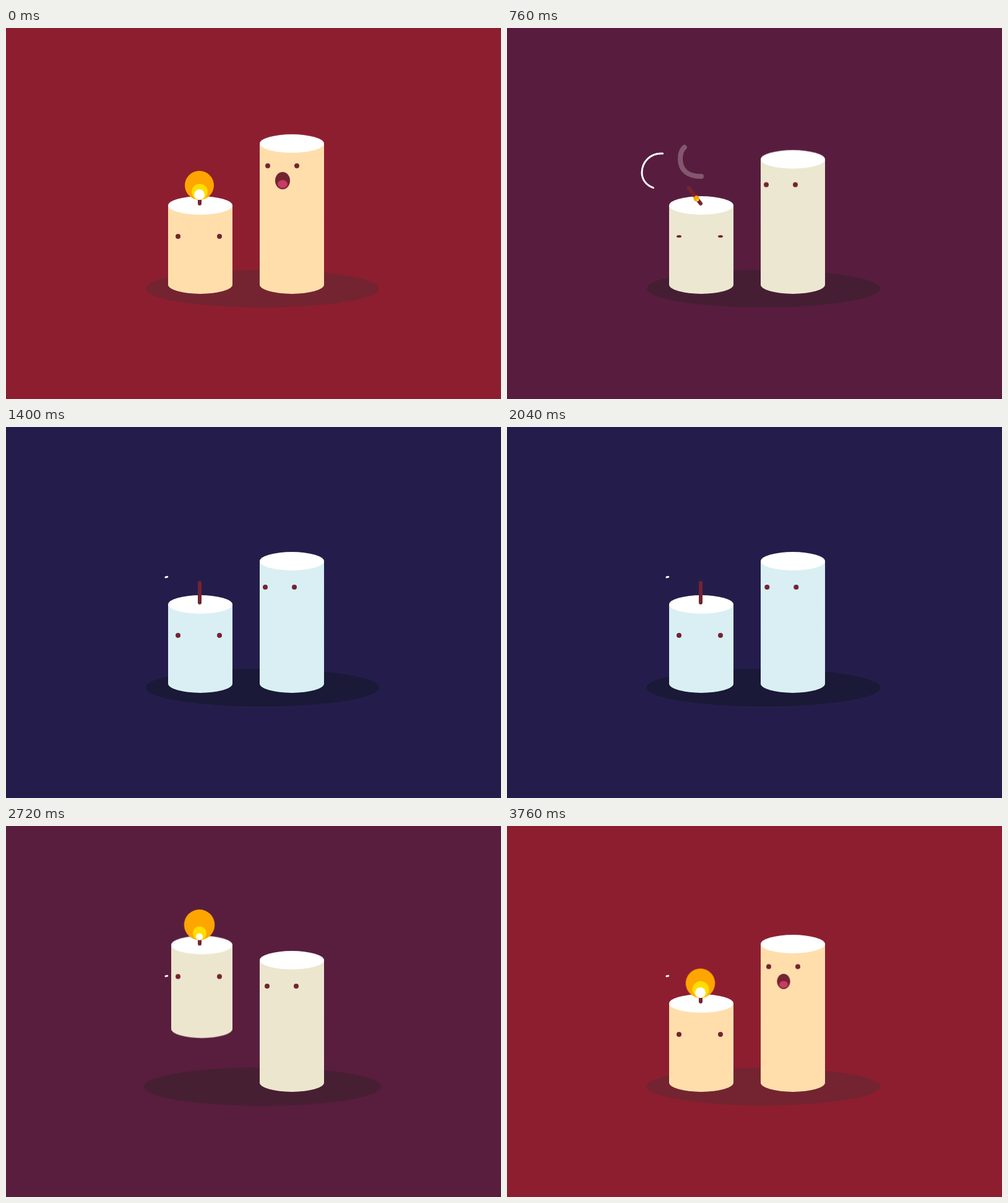
Recreate the animation shown at these times as an HTML page without scripts. Size 800 by 600 pixels, loop 3800 ms.

```html
<!DOCTYPE html>
<html lang="en">
<head>
<meta charset="utf-8">
<title>Two candles</title>
<style>
html, body { margin: 0; width: 100%; height: 100%; overflow: hidden; }
svg { display: block; width: 800px; height: 600px; }
svg * { animation: 3.8s linear infinite; }

/* Colours that change with the light */
.room { --warm: #8d1e30; --cool: #241d4c; animation-name: tint; }
.wax { --warm: #ffdeac; --cool: #d9eff3; animation-name: tint; }
.shadow { --warm: #742430; --cool: #1a1937; animation-name: tint, ground; transform-origin: 414.5px 421.5px; }
.dark { fill: #742331; }
@keyframes tint {
  0%, 18.2%, 73.2%, 100% { fill: var(--warm); }
  21.8%, 70% { fill: var(--cool); }
}
@keyframes ground {
  0%, 62%, 91%, 100% { transform: scale(1); }
  68.4% { transform: scale(.96); }
  71.6% { transform: scale(1.013); }
  75.5% { transform: scale(1.1); }
  80% { transform: scale(.963); }
  85% { transform: scale(1.008); }
}

/* Short candle */
.hop { animation-name: hop; }
@keyframes hop {
  0%, 55%, 88%, 100% { transform: none; }
  59.5%, 60.5% { transform: translateY(8px); }
  62.1% { transform: translateY(0); animation-timing-function: cubic-bezier(.33, .67, .67, 1); }
  68.4% { transform: translateY(-126px); animation-timing-function: cubic-bezier(.33, 0, .67, .33); }
  74.7% { transform: translateY(0); }
  76.3% { transform: translateY(8px); }
  80% { transform: translateY(4px); }
}
.short { animation-name: tint, squash; }
@keyframes squash {
  0%, 55%, 88%, 100% { d: path("M262 287V415A52 15 0 0 0 366 415V287Z"); }
  59.5%, 60.5% { d: path("M255 291V407A59 15 0 0 0 373 407V291Z"); }
  62.1% { d: path("M266 283V415A49 15 0 0 0 364 415V283Z"); }
  68.4% { d: path("M264 287V417A51 15 0 0 0 366 417V287Z"); }
  71.6% { d: path("M267 286V421.5A49.5 15 0 0 0 366 421.5V286Z"); }
  74.7% { d: path("M267 286V415A49.5 15 0 0 0 366 415V286Z"); }
  76.3% { d: path("M256 291V407A59.5 15 0 0 0 375 407V291Z"); }
  80% { d: path("M259.5 289V411A55.75 15 0 0 0 371 411V289Z"); }
}
.rim { animation-name: rim; }
@keyframes rim {
  0%, 55%, 88%, 100% { cx: 314px; cy: 287px; rx: 52px; }
  59.5%, 60.5% { cx: 314px; cy: 291px; rx: 59px; }
  62.1% { cx: 315px; cy: 283px; rx: 49px; }
  68.4% { cx: 315px; cy: 287px; rx: 51px; }
  71.6%, 74.7% { cx: 316.5px; cy: 286px; rx: 49.5px; }
  76.3% { cx: 315.5px; cy: 291px; rx: 59.5px; }
  80% { cx: 315.25px; cy: 289px; rx: 55.75px; }
}
.blink { animation-name: blink; transform-origin: 312px 337px; }
@keyframes blink {
  0%, 13%, 21%, 100% { transform: scaleY(1); }
  14.5%, 19% { transform: scaleY(0); }
}
.wick { animation-name: bend; transform-origin: 313px 284px; }
@keyframes bend {
  0%, 15.5%, 35%, 100% { transform: rotate(0); }
  17.9% { transform: rotate(-13.8deg); }
  22.1%, 24% { transform: rotate(-60deg); animation-timing-function: ease-in-out; }
}
.flame { animation-name: flame; transform-origin: 312.5px 278px; }
@keyframes flame {
  0%, 100% { transform: scale(1); }
  17.9% { transform: scale(var(--blown)); }
  20.5%, 69% { transform: scale(0); }
  71.6% { transform: scale(var(--lit)); }
  80% { transform: scale(var(--low)); }
  98.95% { transform: scale(var(--calm)); }
}

/* Tall candle */
.lift { animation-name: lift; }
@keyframes lift {
  0%, 100% { transform: translateY(-30px); animation-timing-function: ease-out; }
  5% { transform: translateY(-45px); }
  9.5% { transform: translateY(-44px); animation-timing-function: ease-in-out; }
  15.5% { transform: translateY(4px); }
  17.9% { transform: translateY(2px); }
  22.1% { transform: translateY(-11px); animation-timing-function: ease-out; }
  24% { transform: translateY(-12px); animation-timing-function: ease-in-out; }
  36%, 90.5% { transform: translateY(0); animation-timing-function: cubic-bezier(.4, 0, .8, .8); }
  98.95% { transform: translateY(-26px); }
}
.puff { animation-name: tint, puff; transform-origin: 462px 296px; }
@keyframes puff {
  0%, 2%, 15%, 100% { transform: scaleX(.8); }
  7.5%, 10% { transform: scaleX(1); }
}
.face { animation-name: face; }
@keyframes face {
  0%, 5%, 100% { transform: translate(0, -6px); }
  11%, 17.9% { transform: translate(-4px, -2px); }
  22.1%, 40% { transform: translate(-4px, 0); }
  53.7% { transform: translate(-2.7px, 0); }
  71.6% { transform: translate(-1px, 0); }
  80% { transform: translate(-.5px, 0); }
  90.5% { transform: none; }
  98.95% { transform: translate(0, -5.5px); }
}
.mouth { animation-name: gasp; transform-origin: 447px 283px; }
@keyframes gasp {
  0%, 100% { transform: scale(1); }
  3% { transform: scale(1.1); }
  8%, 91% { transform: scale(0); }
  98.95% { transform: scale(.88); }
}

/* Breath and smoke */
.air { fill: none; stroke: #fff; stroke-linecap: round; }
.breath { stroke-width: 3; stroke-dasharray: 84 400; animation-name: breath; }
@keyframes breath {
  0%, 10.07% { stroke-dashoffset: 90; }
  25.6%, 100% { stroke-dashoffset: -306; }
}
.smoke { stroke-width: 8; stroke-dasharray: 89 400; opacity: .26; animation-name: smoke; }
@keyframes smoke {
  0%, 16.4% { stroke-dashoffset: 95; }
  17.9% { stroke-dashoffset: 63; }
  22.1% { stroke-dashoffset: -26; }
  35.5%, 100% { stroke-dashoffset: -310; }
}
</style>
</head>
<body>
<svg viewBox="0 0 800 600">
  <clipPath id="base"><path d="M380 0H540V415H514A52 15 0 0 1 410 415H380Z"/></clipPath>
  <rect class="room" width="800" height="600"/>
  <ellipse class="shadow" cx="414.5" cy="421.5" rx="189" ry="30.5"/>

  <g class="hop">
    <path class="wax short" d="M262 287V415A52 15 0 0 0 366 415V287Z"/>
    <ellipse class="rim" cx="314" cy="287" rx="52" ry="15" fill="#fff"/>
    <g class="dark blink">
      <circle cx="278" cy="337" r="4"/>
      <circle cx="345" cy="337" r="4"/>
    </g>
    <g class="wick">
      <path d="M313 252V284" stroke="#742331" stroke-width="6" stroke-linecap="round"/>
      <circle class="flame" style="--blown:1.085;--lit:1.053;--low:.84;--calm:1.01" cx="312.5" cy="254.5" r="23.5" fill="#ffa500"/>
      <circle class="flame" style="--blown:.73;--lit:.85;--low:1.08;--calm:1.04" cx="313" cy="265" r="13" fill="#ffde00"/>
      <circle class="flame" style="--blown:.6;--lit:.65;--low:1.27;--calm:1" cx="312.5" cy="269.5" r="8.5" fill="#fff"/>
    </g>
  </g>

  <path class="air smoke" d="M314 240C302 240 295 238 289 233C283 228 280 220 280 212C280 196 286 190 304 185C316 182 323 179 329 173C350 150 340 125 315 112C285 98 272 72 290 56C298 48 306 44 310 35"/>
  <path class="air breath" d="M400 261H252C232 261 218 250 218 234C218 216 232 203 249 203C264 203 274 214 274 226C274 236 268 241 258 243"/>

  <g clip-path="url(#base)">
    <g class="lift">
      <rect class="wax" x="410" y="217" width="104" height="300"/>
      <path class="wax puff" d="M410 217C394 262 394 330 410 375H514C530 330 530 262 514 217Z"/>
      <ellipse cx="462" cy="217" rx="52" ry="15" fill="#fff"/>
      <g class="face dark">
        <circle cx="423" cy="259" r="4"/>
        <circle cx="470" cy="259" r="4"/>
        <g class="mouth">
          <ellipse cx="447" cy="283" rx="12" ry="14"/>
          <ellipse cx="447" cy="288.5" rx="8" ry="6.5" fill="#c83a66"/>
        </g>
      </g>
    </g>
  </g>
</svg>
</body>
</html>
```
